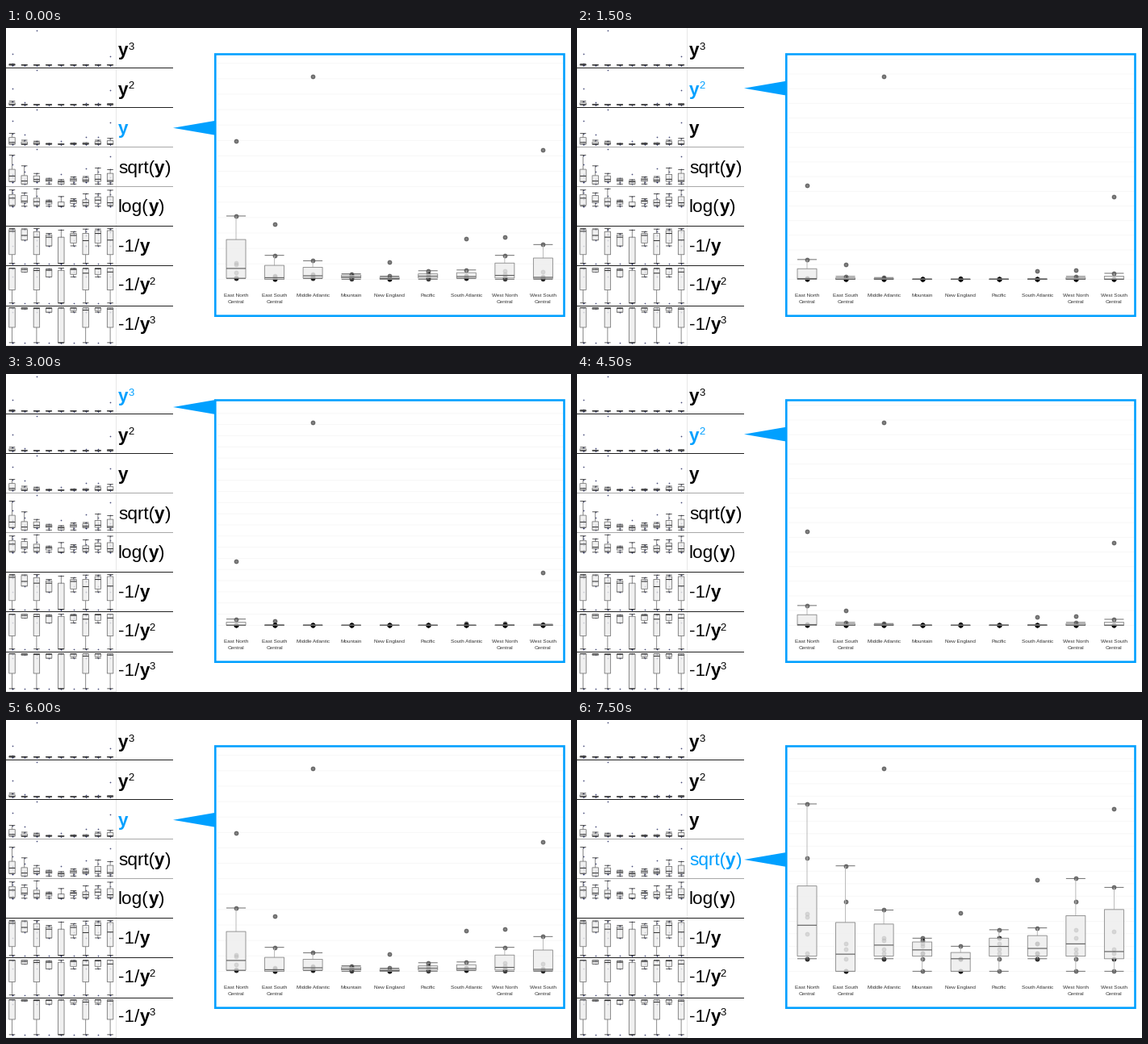
Animation of 700x394 px, one loop 8000 ms. Source, as a matplotlib script:

```python
import matplotlib.pyplot as plt
import numpy as np
from matplotlib.animation import FuncAnimation
from matplotlib.patches import Polygon, Rectangle

W, H, DPI = 700, 394, 100
STEP, HOLD = 500, 1500
PX = 72 / DPI
BLUE = "#00a0ff"
ROW_H = 49.15

plt.rcParams["font.family"] = "Liberation Sans"
plt.rcParams["path.snap"] = False

# largest, second and third count, median, number of zeros
REGIONS = {
    "East North\nCentral": (179, 82, 21, 14, 0),
    "East South\nCentral": (71, 31, 5, 2, 3),
    "Middle Atlantic": (263, 24, 6, 5, 0),
    "Mountain": (7, 6, 5, 3, 1),
    "New England": (22, 4, 1, 1, 3),
    "Pacific": (11, 7, 7, 4, 1),
    "South Atlantic": (53, 12, 5, 3.5, 0),
    "West North\nCentral": (55, 31, 11, 5, 1),
    "West South\nCentral": (168, 45, 10, 2, 1),
}
PEAK = 263
POWERS = [3, 2, 1, 0.5, 0, -1, -2, -3]
ORDER = [2, 1, 0, 1, 2, 3]

fig = plt.figure(figsize=(W / DPI, H / DPI), dpi=DPI, facecolor="white")
ax = fig.add_axes([0, 0, 1, 1])
ax.set_xlim(0, W)
ax.set_ylim(H, 0)
ax.axis("off")


def line(x0, y0, x1, y1, color, width, z=1):
    return ax.plot([x0, x1], [y0, y1], color=color, lw=width * PX,
                   solid_capstyle="butt", zorder=z)[0]


def rect(x, y, w, h, z, **style):
    return ax.add_patch(Rectangle((x, y), w, h, zorder=z, **style))


def text(x, y, s, size, color="black", **style):
    return ax.text(x, y, s, fontsize=size * PX, color=color, zorder=6,
                   va="baseline", **style)


def spread(top, second, third, mid, zeros):
    """Eight counts: the upper three, a pair around the median, a low tail."""
    pair = np.rint([mid * 4 / 3, mid * 2 / 3])
    counts = np.array([top, second, third, *pair, 2, 1, 1], float)
    counts[8 - zeros:] = 0
    return counts


def transform(counts, power):
    if power > 0:
        return (counts / PEAK) ** power
    c = counts[counts > 0]
    return np.log(c) / np.log(PEAK) if power == 0 else -c ** power


def summary(values):
    v = np.sort(values)
    half = (len(v) + 1) // 2
    q1, mid, q3 = np.median(v[:half]), np.median(v), np.median(v[-half:])
    reach = 1.5 * (q3 - q1)
    inside = v[(v >= q1 - reach) & (v <= q3 + reach)]
    return inside.min(), q1, mid, q3, inside.max()


def nice_step(span, ticks=15):
    raw = span / ticks
    base = 10 ** np.floor(np.log10(raw))
    digit = sum(raw / base >= np.sqrt(k) for k in (2, 10, 50))
    return base * (1, 2, 5, 10)[digit]


def box(x, ys, width, edge, ink, stem, weight):
    lo, q1, mid, q3, hi = ys
    left, right = x - width / 2, x + width / 2
    return [
        line(x, lo, x, q1, stem, weight, 3),
        line(x, q3, x, hi, stem, weight, 3),
        line(left, lo, right, lo, ink, weight, 3),
        line(left, hi, right, hi, ink, weight, 3),
        rect(left, q3, width, q1 - q3, 4, fc=(0.93, 0.93, 0.93, 0.8),
             ec=edge, lw=weight * PX),
        line(left, mid, right, mid, ink, weight * 1.3, 5),
    ]


def dots(x, ys, size, face, edge, weight):
    return ax.scatter([x] * len(ys), ys, s=(size * PX) ** 2, facecolors=[face],
                      edgecolors=[edge], linewidths=weight * PX, zorder=2)


def label(row, color):
    power, base = POWERS[row], 34 + 48.55 * row
    before = "-1/" if power < 0 else {0: "log(", 0.5: "sqrt("}.get(power, "")
    after = ")" if before.endswith("(") else ""
    exponent = str(abs(power)) if abs(power) > 1 else ""
    parts, x = [], 139
    for s, size, weight, rise in [(before, 22.5, "normal", 0),
                                  ("y", 22.5, "bold", 0),
                                  (after, 22.5, "normal", 0),
                                  (exponent, 13, "normal", 7.5)]:
        if s:
            parts.append(text(x, base - rise, s, size, color, weight=weight))
            x = parts[-1].get_window_extent().x1
    return parts


def thumbnail(row):
    power = POWERS[row]
    zero = ROW_H * row + 24.2 + 21.6 * np.sign(power)
    height = 43.2 if power else 21.6
    for k, keys in enumerate(REGIONS.values()):
        x = 7.5 + 15.2 * k
        v = transform(spread(*keys), power)
        dots(x, zero - height * v, 1.7, (0.1, 0.13, 0.35, 0.8), "none", 0)
        box(x, zero - height * np.array(summary(v)), 7.5,
            "#707070", "#333333", "#707070", 0.8)


def chart(row):
    power = POWERS[row]
    zero, height = 311.3, 251.3
    tip = max(41, ROW_H * row + 25.5)
    pointer = Polygon([(207, tip), (259.5, tip - 9), (259.5, tip + 9)],
                      fc=BLUE, ec="none", zorder=3)
    parts = [ax.add_patch(pointer)]
    span = PEAK ** power
    for y in np.arange(zero, 38, -height * nice_step(span) / span):
        parts.append(line(262, y, 690, y, "#f6f6f6", 0.8))
    for k, keys in enumerate(REGIONS.values()):
        x = 285 + 47.55 * k
        v = transform(spread(*keys), power)
        parts.append(dots(x, zero - height * v, 5, (0, 0, 0, 0.5),
                          (0, 0, 0, 0.5), 0.8))
        parts += box(x, zero - height * np.array(summary(v)), 24,
                     "#8c8c8c", "#606060", "#b4b4b4", 0.9)
    return parts


# left panel
line(136.5, 0, 136.5, H, "#e2e2e2", 0.8)
line(0, 393.5, 137, 393.5, "#dddddd", 0.8)
for i in range(1, len(POWERS)):
    y = np.floor(ROW_H * i) + 0.5
    line(0, y, 207, y, "#a8a8a8" if i in (3, 4) else "#222222", 1)
for i in range(len(POWERS)):
    thumbnail(i)

# callout
rect(259.3, 32.5, 432.2, 324.2, 6, fill=False, ec=BLUE, lw=2.6 * PX,
     joinstyle="miter")
for k, name in enumerate(REGIONS):
    for n, part in enumerate(name.split("\n")):
        text(285 + 47.55 * k, 333.4 + 7.2 * n, part, 6.4, "#333333", ha="center")

plain = [label(i, "black") for i in range(len(POWERS))]
active = {i: chart(i) + label(i, BLUE) for i in set(ORDER)}


def show(artists, on):
    for a in artists:
        a.set_visible(on)


def update(frame):
    current = ORDER[frame * STEP // HOLD]
    for i, parts in enumerate(plain):
        show(parts, i != current)
    for i, parts in active.items():
        show(parts, i == current)
    return []


anim = FuncAnimation(fig, update, frames=8000 // STEP, interval=STEP,
                     init_func=lambda: update(0), repeat=True, repeat_delay=0)
plt.show()
```
